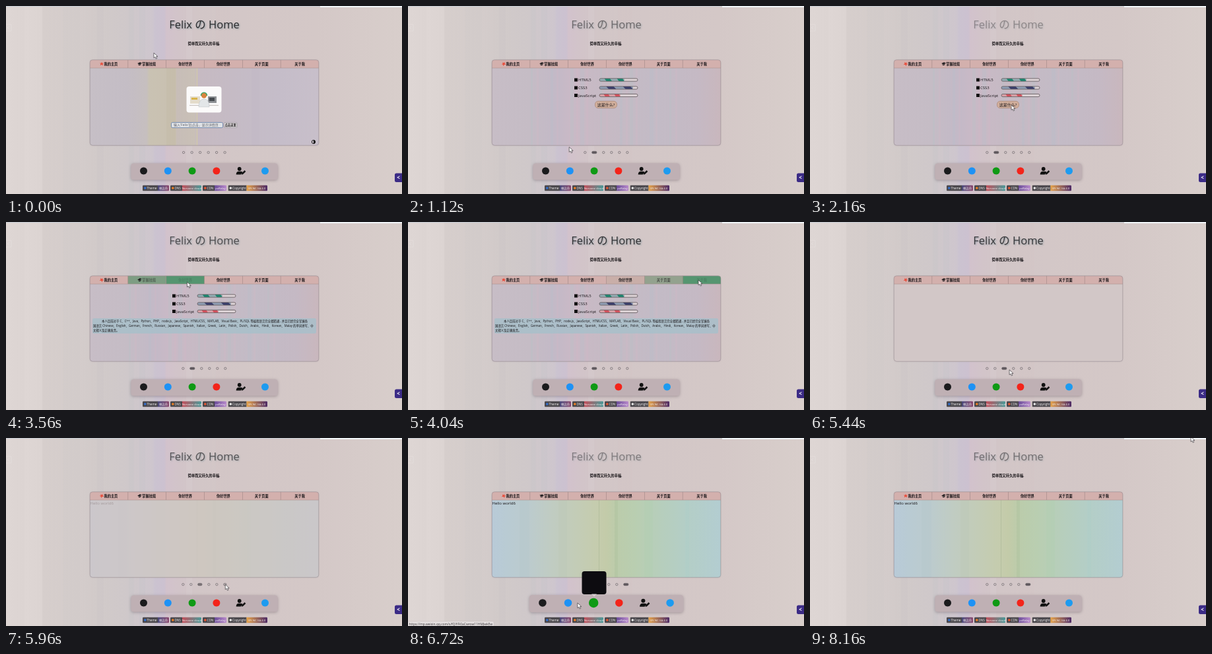
Animation of 600x285 px, one loop 8200 ms. Source, as an HTML page:

```html
<!DOCTYPE html>
<html lang="zh-CN">
<head>
<meta charset="utf-8">
<title>Home</title>
<style>
html, body { margin: 0; width: 100%; height: 100%; overflow: hidden; background: #d4cac9; }
svg { display: block; width: 100vw; height: 100vh; }
text { font-family: "Open Sans", "Noto Sans CJK SC", "Noto Sans CJK", sans-serif; white-space: pre; }
</style>
</head>
<body>
<script>
const LOOP = 8200;
const NS = 'http://www.w3.org/2000/svg';

function el(tag, attrs, parent, text) {
  const node = document.createElementNS(NS, tag);
  for (const k in attrs) node.setAttribute(k, attrs[k]);
  if (text) node.textContent = text;
  parent.appendChild(node);
  return node;
}
const svg = el('svg', { viewBox: '0 0 600 285', preserveAspectRatio: 'none' }, document.body);
const defs = el('defs', {}, svg);
const group = (parent = svg, attrs = {}) => el('g', attrs, parent);
const box = (p, x, y, w, h, fill, more) => el('rect', { x, y, width: w, height: h, fill, ...more }, p);
const dot = (p, cx, cy, r, fill, more) => el('circle', { cx, cy, r, fill, ...more }, p);
const path = (p, d, fill, more) => el('path', { d, fill, ...more }, p);
const label = (p, x, y, size, str, more) => el('text', { x, y, 'font-size': size, fill: '#161316', ...more }, p, str);
const MID = { 'text-anchor': 'middle' };
const BOLD = { ...MID, 'font-weight': 700 };

// Horizontal gradient in stage pixels from [x, colour] stops.
function grad(id, stops) {
  const g = el('linearGradient', { id, gradientUnits: 'userSpaceOnUse', x1: 0, x2: 600, y1: 0, y2: 0 }, defs);
  for (const [x, c] of stops) el('stop', { offset: x / 600, 'stop-color': c }, g);
  return `url(#${id})`;
}
function clip(id, x, y, w, h, rx) {
  box(el('clipPath', { id }, defs), x, y, w, h, '#000', { rx });
  return { 'clip-path': `url(#${id})` };
}
function bands(p, y, h, list) {
  for (const [x, w, c, o] of list) box(p, x, y, w, h, c, { opacity: o });
}

// ---- page background
box(svg, 0, 0, 600, 285, grad('page', [
  [0, '#ded6d4'], [54, '#dad2d0'], [56, '#d6cecc'], [112, '#d4cccb'], [138, '#d1cac9'],
  [184, '#cfc8ca'], [222, '#cec6ce'], [226, '#cbc3d0'], [240, '#ccc1d0'], [243, '#d2c2cc'],
  [262, '#d2c4c9'], [290, '#d2c6c7'], [360, '#d3c7c7'], [470, '#d4c8c7'], [600, '#d8cecb']]));
bands(svg, 0, 285, [[28, 27, '#fff', .05], [86, 26, '#b0a8a6', .05], [138, 10, '#aab', .06],
  [186, 8, '#b4bcc0', .1], [202, 9, '#b4bcc0', .12], [273, 9, '#fff', .05], [318, 22, '#c8b8bc', .1]]);
box(svg, 0, 0, 600, 1, '#c9cfd6');
box(svg, 476, 0, 124, 2, '#f1f5f8');
path(svg, 'M0 28H8V38H0M5 31L2 33L5 35', 'none', { stroke: '#fff', opacity: .15 });

// ---- heading
const title = group(svg, { style: 'filter:drop-shadow(1.8px 1.8px .8px rgba(80,115,125,.65))' });
label(title, 300.5, 33.5, 16.5, 'Felix の Home', { ...MID, fill: '#1f2023' });
label(svg, 300, 58.7, 5.3, '简单而又持久的幸福.', BOLD);

// ---- panel and slides
box(svg, 127, 81.5, 347, 130.5, '#8a7c80', { rx: 4, opacity: .15, style: 'filter:blur(1px)' });
box(svg, 127, 81.5, 347, 130, '#d1c6c7', { rx: 4 });
const panel = group(svg, clip('panel', 127, 81.5, 347, 130, 4));
const slides = [];
function slide(i, fill) {
  slides[i] = group(panel);
  if (fill) box(slides[i], 127, 94, 347, 118, fill);
  return slides[i];
}

const home = slide(0, grad('home', [
  [127, '#c6bfc6'], [184, '#c4bdc5'], [213, '#c6bfbf'], [217, '#c9c2b3'], [257, '#c9c0b0'],
  [259, '#c7bdb8'], [285, '#c9c0b6'], [292, '#c6bac2'], [345, '#c5bbc5'], [416, '#c5bdc9'], [474, '#c8bfca']]));
bands(home, 94, 118, [[243, 14, '#bcb59f', .3], [289, 1, '#d8d09c', .7], [372, 12, '#b8b0c0', .2]]);
box(home, 273.5, 122, 53, 39.5, '#fbfafa', { rx: 4 });
box(home, 279, 137, 15, 11, '#e4dccb');
box(home, 281, 139, 9, 3, '#d9b44a');
box(home, 306, 137, 13, 10, '#8d9094');
box(home, 308, 139, 8, 5, '#45494e');
box(home, 278, 150, 44, 1.2, '#c9c4c0');
path(home, 'M292 153Q292 141 300 141Q308 141 308 153Z', '#e3e6e8', { stroke: '#b9bcc0', 'stroke-width': .5 });
dot(home, 300, 135.5, 4.2, '#d9853f');
path(home, 'M295.5 136A4.5 4.8 0 0 1 304.5 136', 'none', { stroke: '#3fa66a', 'stroke-width': 1.6 });
box(home, 250.5, 176.5, 78, 8, '#dfe2e6', { rx: 2, stroke: '#5d7ca6', 'stroke-width': .8 });
label(home, 254, 182.4, 5, "输入'Felix'后点击，显示详情页", { fill: '#66666c' });
box(home, 330.5, 177, 19.5, 7.2, '#e6e2e3', { rx: 1, stroke: '#77737a', 'stroke-width': .5 });
label(home, 340.2, 182.3, 4.4, '点击这里', BOLD);
dot(home, 466, 206, 2.7, 'none', { stroke: '#111', 'stroke-width': .9 });
path(home, 'M466 203.3A2.7 2.7 0 0 1 466 208.7Z', '#111');

const skills = slide(1, grad('skill', [
  [127, '#c7bdc6'], [184, '#c5bcc5'], [226, '#c3b9c7'], [245, '#c9b9c6'], [300, '#c6bac4'],
  [380, '#c3bbc6'], [440, '#c5b9c4'], [474, '#c9b7bd']]));
for (let i = 0; i < 9; i++) {
  const x = 186 + i * 25 + (i % 3) * 5;
  bands(skills, 94, 118, [[x, 3 + i % 4, i % 2 ? '#b3bfc8' : '#b5c3c4', .28], [x + 9, 3, '#d0b5c4', .3]]);
}
[['HTML5', 112, 38, '#1e8770', '#93adb3'], ['CSS3', 124, 51, '#3b3f6c', '#8f9db3'],
 ['JavaScript', 135.5, 32, '#d0515c', '#d6a0a6']].forEach(([name, y, w, dark, pale], i) => {
  const top = y - 2.1;
  box(skills, 252, y - 2.5, 5, 5, '#111');
  label(skills, 258, y + 2.3, 6, name);
  box(skills, 290, top, 58, 4.2, '#dcd2d5', { rx: 2.1 });
  const bar = group(skills, clip('bar' + i, 290, top, w, 4.2, 2));
  box(bar, 290, top, w, 4.2, pale);
  // Two slanted stripes, scaled with the bar.
  for (const k of [.2, .7]) path(bar, `M${290 + w * k} ${top}h${w * .22}l${w * .08} 4.2h${-w * .22}Z`, dark);
  box(skills, 290, top, 58, 4.2, 'none', { rx: 2.1, stroke: '#5d5659', 'stroke-width': .8 });
});
const ask = group(skills);
box(ask, 283.5, 144.3, 33, 10.5, '#d1ae9b', { rx: 4.5, stroke: '#a98674', 'stroke-width': .7 });
label(ask, 300, 151.8, 6, '这是什么?', MID);
const answer = group(skills);
box(answer, 131, 146, 339, 23, '#a8c0cb', { rx: 2, opacity: .85 });
label(answer, 145, 152.2, 4.4, '本人目前对于 C、C++、Java、Python、PHP、node.js、JavaScript、HTML/CSS、MATLAB、Visual Basic、PL/SQL 等编程语言完全都精通 , 并且已经完全掌握各');
label(answer, 132, 159.4, 4.4, '国语言 Chinese、English、German、French、Russian、Japanese、Spanish、Italian、Greek、Latin、Polish、Dutch、Arabic、Hindi、Korean、Malay 的单词拼写、中');
label(answer, 132, 166.2, 4.4, '文释义及正确发音。');

slide(2, '#d2c7c7');
const last = slide(5, grad('last', [
  [127, '#b8cad8'], [150, '#b9cbd3'], [184, '#bccbcd'], [215, '#c0ccc3'], [243, '#c2ccba'],
  [285, '#c5ccae'], [300, '#c3cba9'], [318, '#bbccab'], [345, '#b9ceb1'], [372, '#b7ceb9'],
  [416, '#b4cec5'], [474, '#b3cdd1']]));
bands(last, 94, 118, [[169, 15, '#aec4c8', .25], [228, 13, '#b4c2b0', .2], [289, 1, '#9eb08c', .4],
  [313, 5, '#a6b894', .3], [358, 13, '#accaac', .25], [420, 6, '#a8cbc8', .25]]);
label(last, 127.5, 101, 6, 'Hello world6');

// ---- tabs
const TABW = 347 / 6;
box(panel, 127, 81.5, 347, 12.5, '#d3b0ad');
const tabs = ['我的主页', '掌握技能', '你好世界', '你好世界', '关于页面', '关于我'].map((name, i) => {
  const x = 127 + i * TABW;
  const hover = box(panel, x, 81.5, TABW, 12.5, '#559570');
  const text = label(panel, x + TABW / 2 + (i < 2 ? 3 : 0), 89.6, 5.2, name, BOLD);
  if (i) box(panel, x - .3, 81.5, .6, 12.5, '#a08886');
  return { x, hover, text };
});
const flame = path(panel, 'M0-3L1-1L3-1.5L1.6.4L2.4 2.6L0 1.4L-2.4 2.6L-1.6.4L-3-1.5L-1-1Z', '#e8503f');
const cap = path(panel, 'M-3.4-.6L.6-2.4L3.6-1L-.4.8ZM-2 .6L-.4 1.3L2 .3V1.6L-.4 2.5L-2 1.7Z', '#1c1a1c');
box(panel, 127, 93.7, 347, .6, '#a8918f');
box(svg, 127.2, 81.7, 346.6, 129.6, 'none', { rx: 4, stroke: '#968c90', 'stroke-width': .6 });

// ---- pager
const dots = Array.from({ length: 6 }, () => box(svg, 0, 220.3, 3.4, 3.4, '#5e575c', { rx: 1.7, stroke: '#6e676c', 'stroke-width': .7 }));

// ---- dock
const dock = group();
box(dock, 189.5, 238.5, 222, 25, '#bfb0b4', { rx: 4, style: 'filter:drop-shadow(0 1px 2px rgba(70,55,65,.35))' });
const icons = ['#1b1b1d', '#1d92f5', '#0f9a14', '#f3241a', '#111', '#1d9bf0'].map((c, i) => {
  const g = group(dock), x = 208.5 + i * 36.8;
  if (i === 4) {
    dot(g, -2, -3, 2.9, c);
    path(g, 'M-7 5.5Q-7 .8-3 .8H0Q2 .8 3 2L0 5.5Z', c);
    path(g, 'M1 5.6L1.5 3.4L5.8-.9L7.6.9L3.2 5.2Z', c);
  } else dot(g, 0, 0, 5.5, c);
  return { g, x };
});
const card = group();
box(card, 263.5, 202, 37, 35, '#0d0c10', { rx: 4 });
path(card, 'M278 236.5h8l-4 4Z', '#d8d0d2');

// ---- badges
[[207, 23, 17, 'Theme', '林远舟', '#2f6fd0', '#4a4a7c', '#8b4a70'],
 [249, 18, 29, 'DNS', 'Norvane cloud', '#f08022', '#c2505c', '#4a9a98'],
 [298, 18, 18, 'CDN', 'pxRelay', '#e8552f', '#6a4c98', '#b98acb'],
 [336.5, 28, 31.5, 'Copyright', 'BY-NC-SA 4.0', '#e8e8e8', '#e6a34a', '#4d2a66']
].forEach(([x, w1, w2, a, b, c, from, to], i) => {
  const g = group(svg, clip('badge' + i, x, 271.5, w1 + w2, 9, 1.5));
  box(g, x, 271.5, w1, 9, '#4b484d');
  box(g, x + w1, 271.5, w2, 9, grad('tone' + i, [[x + w1, from], [x + w1 + w2, to]]));
  dot(g, x + 3.8, 276, 1.8, c);
  label(g, x + 6.5, 277.8, 4.6, a, { fill: '#f1eff0' });
  label(g, x + w1 + w2 / 2, 277.8, 4.3, b, { ...MID, fill: '#f6f3f4' });
});

// ---- side handle, link hint, pointer
box(svg, 589, 253.5, 15, 13.5, '#3b2b86', { rx: 2.5 });
label(svg, 594.5, 263, 8, '<', { ...BOLD, fill: '#fff' });
const hint = group();
box(hint, -2, 278, 132, 9, '#e4dfdf', { rx: 1.5, stroke: '#c4bdbe', 'stroke-width': .5 });
label(hint, 1.5, 283.7, 4.9, 'https://mp.weixin.qq.com/s/fQIYFi0aCwrow11HMJwkEw', { fill: '#3c393c' });
const pointer = path(svg, 'M0 0V7.6L1.9 6.1L3.2 9L4.7 8.4L3.5 5.6H6Z', '#fff', { stroke: '#3d393d', 'stroke-width': .7 });

// ---- motion
const CURSOR = [[0, 224, 71], [350, 214, 86], [600, 214, 87], [1000, 245, 190], [1300, 243, 249], [1650, 246, 249],
  [2000, 303, 160], [2160, 305, 150], [2600, 305, 150], [3000, 220, 140], [3250, 195, 91], [3420, 222, 91],
  [3560, 274, 91], [3950, 440, 88], [4150, 440, 88], [4520, 271, 208], [5000, 268, 220], [5150, 294, 222],
  [5440, 302, 224], [5800, 330, 221], [5950, 330, 221], [6250, 392, 249], [6500, 300, 249], [6720, 257, 250],
  [7100, 208, 249], [7550, 215, 249], [8000, 577, -2]];
const PICKS = [[-999, 0], [500, 1], [4050, 5], [5150, 2], [5900, 5]];
const DOCK = [[1150, 0], [1280, 1], [1650, 1], [1800, 0], [6100, 0], [6250, 1], [7550, 1], [7680, 0]];
const CARD = [[6350, 0], [6480, 1], [6760, 1], [6950, 0]];
const ANSWER = [[2600, 0], [2900, 1]];

const clamp = v => Math.max(0, Math.min(1, v));
function at(keys, t, col = 1) {
  if (t <= keys[0][0]) return keys[0][col];
  const i = keys.findIndex(k => k[0] > t);
  if (i < 0) return keys[keys.length - 1][col];
  const a = keys[i - 1], b = keys[i];
  return a[col] + (b[col] - a[col]) * (t - a[0]) / (b[0] - a[0]);
}
const spot = t => [at(CURSOR, t), at(CURSOR, t, 2)];
// Full while the pointer is inside, then fading over the span.
function hovered(t, span, inside) {
  for (let k = 0; k < 12; k++) if (inside(...spot(t - k * span / 12))) return 1 - k / 12;
  return 0;
}
const set = (node, attrs) => { for (const k in attrs) node.setAttribute(k, attrs[k]); };
const place = (node, x, y, s = 1, r = 0) => set(node, { transform: `translate(${x} ${y}) rotate(${r}) scale(${s})` });

function draw(t) {
  title.setAttribute('opacity', .68 + .3 * Math.cos((t - 4700) / 5200 * 2 * Math.PI));

  const n = PICKS.filter(p => p[0] <= t).length - 1;
  const now = PICKS[n][1], before = n ? PICKS[n - 1][1] : 0;
  const mix = clamp((t - PICKS[n][0]) / 260);
  slides.forEach((s, i) => set(s, { opacity: i === now ? mix : i === before ? 1 - mix : 0 }));
  const said = at(ANSWER, t);
  set(ask, { opacity: 1 - said });
  set(answer, { opacity: said });

  const active = dots.map((_, i) => i === 0 ? 0 : i === now ? mix : i === before ? 1 - mix : 0);
  const spare = 1 - active.reduce((a, b) => a + b, 0);
  let x = 268.3 + .8 * spare;
  dots.forEach((d, i) => {
    const w = 3.4 + 4 * active[i];
    set(d, { x: x - 1.7, width: w, 'fill-opacity': active[i] });
    x += 12 + 4 * active[i] + .5 * spare;
  });

  tabs.forEach(tab => {
    const h = hovered(t, 330, (cx, cy) => cy > 81 && cy < 94 && cx >= tab.x && cx < tab.x + TABW);
    set(tab.hover, { opacity: h });
    set(tab.text, { opacity: 1 - .85 * h });
  });
  place(flame, 145, 87.7, 1, 35 * Math.sin(t / 260));
  place(cap, 202.5, 87.7, 1, 12 * Math.sin(t / 340));

  const open = at(DOCK, t), shown = at(CARD, t), s = 1 + .05 * open;
  set(dock, { transform: `translate(300.5 251) scale(${s}) translate(-300.5 -251)` });
  icons.forEach((icon, i) => {
    const h = i === 2 ? shown : hovered(t, 180, (cx, cy) => cy > 240 && cy < 264 && Math.abs(cx - icon.x) < 11);
    place(icon.g, icon.x, 250, 1 + .25 * h);
  });
  set(card, { opacity: shown });
  set(hint, { opacity: open });
  place(pointer, ...spot(t));
}

const start = performance.now();
function tick() {
  draw((performance.now() - start) % LOOP);
  requestAnimationFrame(tick);
}
tick();
</script>
</body>
</html>
```
